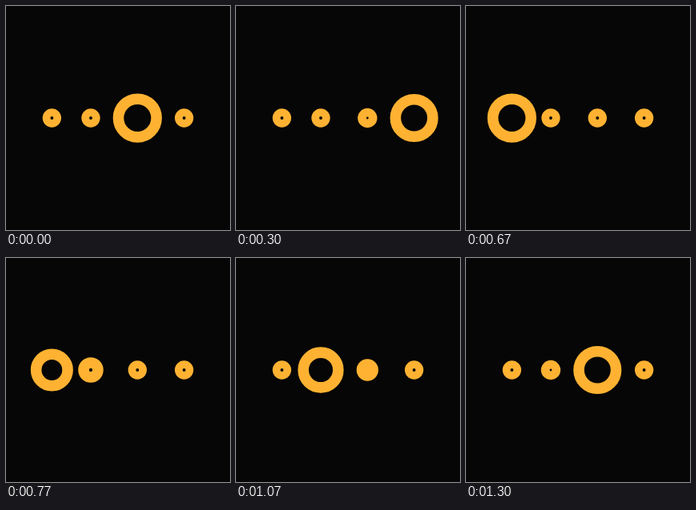
Write an HTML page that moves like this. It is 280 by 280 pixels and loops after 1.33 s.

```html
<!DOCTYPE html>
<html lang="en">
<head>
<meta charset="utf-8">
<title>Pulsing rings</title>
<style>
  html, body { margin: 0; height: 100%; overflow: hidden; background: #060606; }
  svg { display: block; width: 100vw; height: 100vh; }
  circle { fill: none; stroke: #ffb232; }
</style>
</head>
<body>
<svg viewBox="0 0 288 288">
  <circle cx="59" cy="144"/>
  <circle cx="109" cy="144"/>
  <circle cx="169" cy="144"/>
  <circle cx="229" cy="144"/>
</svg>
<script>
const LOOP = 1330, STEPS = 40, STAGGER = 10;
const HALF = 7, SMALL = 5, LARGE = 24.5;
const rings = document.querySelectorAll('circle');

const smooth = u => u * u * (3 - 2 * u);

// Motion runs at 30 steps per second, with step starts rounded to 10 ms.
const stepAt = ms => Math.floor((Math.floor(ms / 10) * 10 + 4) * 0.03);

function draw(ms) {
  const step = stepAt(ms % LOOP);
  rings.forEach((ring, i) => {
    const peak = (20 + i * STAGGER) % STEPS;
    const gap = Math.abs(step - peak);
    const distance = Math.min(gap, STEPS - gap, STAGGER);
    const radius = SMALL + (LARGE - SMALL) * smooth(1 - distance / STAGGER);
    // Below HALF the inner edge crosses the centre and opens a hole again.
    ring.setAttribute('r', Math.max(radius, HALF));
    ring.setAttribute('stroke-width', 2 * Math.min(radius, HALF));
  });
}

const start = performance.now();
function tick() {
  draw(performance.now() - start);
  requestAnimationFrame(tick);
}
tick();
</script>
</body>
</html>
```
